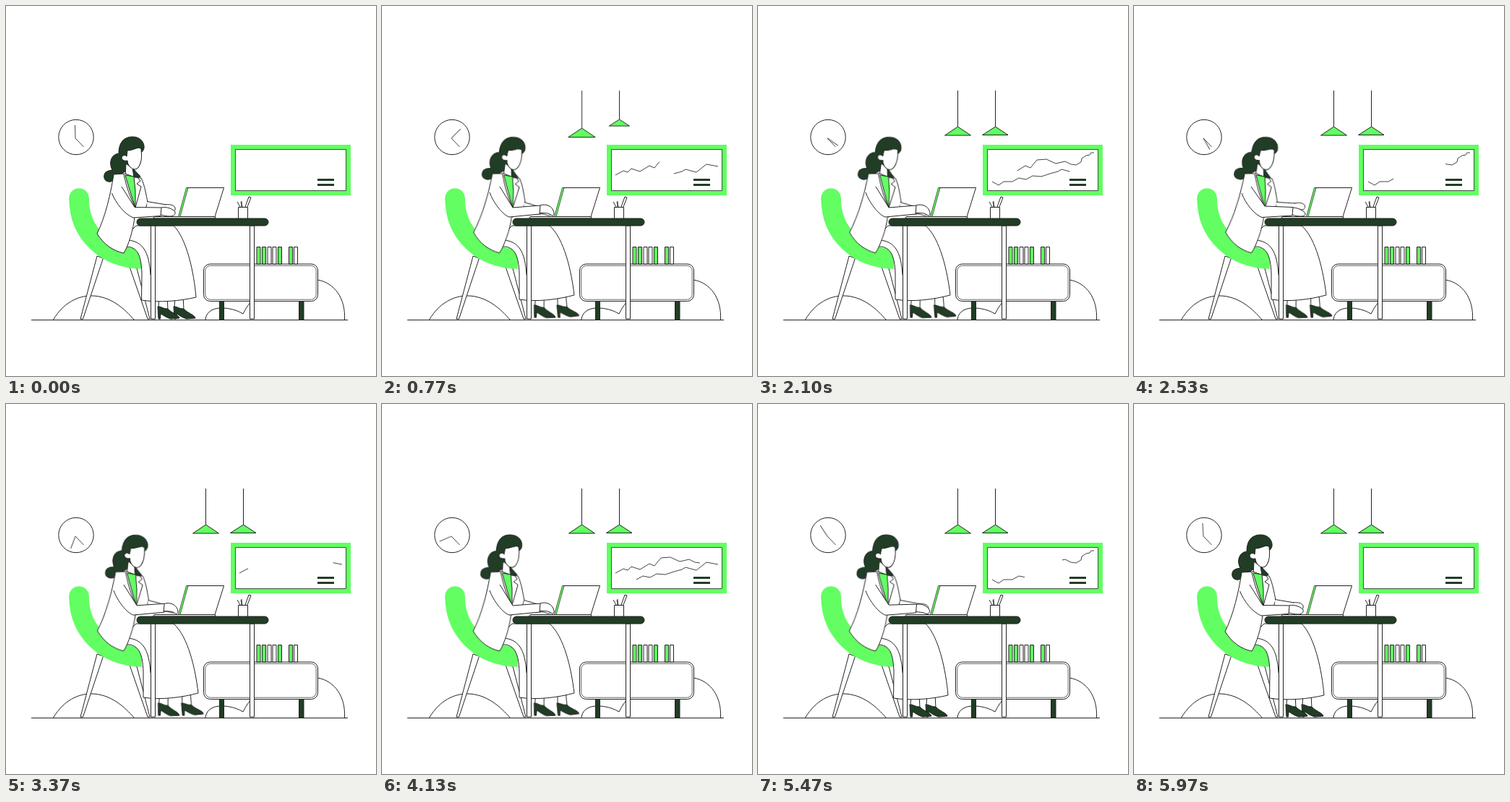
An HTML page without scripts that plays this animation: 512 by 512 pixels, repeating every 6000 ms.

```html
<!DOCTYPE html>
<html lang="en">
<head>
<meta charset="utf-8">
<title>Working at a desk</title>
<style>
  @property --lean { syntax: "<number>"; inherits: true; initial-value: 0; }
  :root { --ink: #222; --green: #62fe62; --dark: #213d25; }
  html, body { margin: 0; width: 100%; height: 100%; overflow: hidden; background: #fff; }
  svg { display: block; width: 100%; height: 100%; fill: #fff; stroke: var(--ink); stroke-width: 1; stroke-linejoin: round; }
  .g { fill: var(--green); }
  .d { fill: var(--dark); }
  .n { fill: none; }
  .soft { stroke: #444; }
  .flat { stroke: none; }

  .minute, .torso, .far, .foot, .lamp, .near, .hand, .skirt { animation: 6s linear infinite; }

  .minute { animation-name: turn; transform-origin: 96px 183px; }
  @keyframes turn { to { transform: rotate(360deg); } }

  .lamp { transform-origin: 276.5px 117px; animation-name: drop; }
  .lamp path { vector-effect: non-scaling-stroke; }
  .late { transform-origin: 328.5px 117px; animation-name: drop-late; }
  @keyframes drop {
    0%, .5% { transform: scale(0); animation-timing-function: ease-out; }
    9% { transform: scale(1.1); animation-timing-function: ease-in-out; }
    16%, 100% { transform: scale(1); }
  }
  @keyframes drop-late {
    0%, 8% { transform: scale(0); animation-timing-function: ease-out; }
    17% { transform: scale(1.1); animation-timing-function: ease-in-out; }
    21.5%, 100% { transform: scale(1); }
  }

  .chart { stroke-dasharray: 1 2; animation: draw 3s infinite; }
  @keyframes draw {
    0%, 2.5% { stroke-dashoffset: 1.01; animation-timing-function: cubic-bezier(.37, 0, .63, 1); }
    52.5%, 55.5% { stroke-dashoffset: 0; animation-timing-function: cubic-bezier(.37, 0, .63, 1); }
    99.5%, 100% { stroke-dashoffset: -1.01; }
  }

  .torso { transform-origin: 172px 330px; transform: rotate(calc(var(--lean) * 2.2deg)); animation-name: lean; animation-timing-function: ease-in-out; }
  .head { transform-origin: 172px 222px; transform: rotate(calc(var(--lean) * 4deg)); }
  @keyframes lean {
    0%, 100% { --lean: 0; }
    12.8% { --lean: 1; }
    27.2% { --lean: .87; }
    42.2% { --lean: 1.1; }
    68.8% { --lean: .36; }
    82.2% { --lean: .9; }
  }

  .near, .hand, .far { animation-timing-function: ease-in-out; }
  .near { animation-name: sleeve; }
  .hand { animation-name: hand; }
  .far { transform-origin: 194px 270px; animation-name: tap; }
  @keyframes sleeve {
    0%, 100% { d: path("M146.500 259C152 273 164 288 176 293L214 290.500L215 279L178 278.500L160 250"); }
    5%, 12.8%, 22%, 34.7%, 47%, 57.5%, 68.8%, 82.2%, 94% { d: path("M149 258C154 272 167 289 176 292L218 288L219 276L181 279L163 250"); }
    9%, 17.5%, 27.2%, 42.2%, 52%, 63%, 75.5%, 88% { d: path("M149 259C154 273 167 289 177 292.500L219 290L220 278.500L181 277L162 250"); }
  }
  @keyframes hand {
    0%, 100% { d: path("M215 279C221 277 232 281 234 285C235 289 231 291 227 291C222 291 218 290 214 289"); }
    5%, 12.8%, 22%, 34.7%, 47%, 57.5%, 68.8%, 82.2%, 94% { d: path("M219 276C226 273 235 277 237 283C239 287 238 291 235 290C230 285 223 287 218 286"); }
    9%, 17.5%, 27.2%, 42.2%, 52%, 63%, 75.5%, 88% { d: path("M220 279C226 279 235 283 237 287C238 290 234 291 230 291C226 291 222 290 219 289"); }
  }
  @keyframes tap {
    0%, 100% { transform: none; }
    5%, 12.8%, 22%, 34.7%, 47%, 57.5%, 68.8%, 82.2%, 94% { transform: translate(2px, 1px) rotate(7deg); }
    9%, 17.5%, 27.2%, 42.2%, 52%, 63%, 75.5%, 88% { transform: translate(1.5px, 1px) rotate(-6deg); }
  }

  .foot, .skirt { animation-timing-function: ease-in-out; }
  .foot { animation-name: rest; transform-origin: 212px 416px; }
  .front { animation-name: step; transform-origin: 234px 418px; }
  .skirt { animation-name: sway; }
  @keyframes rest {
    0%, 82%, 100% { transform: none; }
    12.8%, 69% { transform: translate(.5px, -2px) rotate(2deg); }
  }
  @keyframes step {
    0%, 82%, 100% { transform: none; }
    12.8%, 69% { transform: translate(10px, -2px) rotate(-3deg); }
    27%, 42% { transform: translate(11.5px, -2px) rotate(-2deg); }
  }
  @keyframes sway {
    0%, 82%, 100% { d: path("M164 333C184 332 187 348 188 370L187.500 407C212 411 242 408 263 403C260 368 250 322 232 304L180 304L164 320Z"); }
    12.8%, 69% { d: path("M164 333C184 331 189 346 190 370L190 406C214 410 244 406 266 400C262 366 252 322 232 304L180 304L164 320Z"); }
  }
</style>
</head>
<body>
<svg viewBox="0 0 512 512">
  <defs>
    <g id="shoe">
      <path d="M212 400L211 417L224 421L223 400"/>
      <path class="d" d="M210 416C213 415 217 419 224 419C229 425 239 427 240 432L228 433C221 431 217 427 214 426L213.500 433H211Z"/>
    </g>
    <path id="book" d="M0 333.500h5v23.500h-5z"/>
  </defs>

  <!-- room -->
  <path d="M65.500 434C80 410 100 401 118 401C145 401 165 420 177 434"/>
  <path d="M276 434C277 421 290 417 302 418C315 419 323 423 328 426C332 418 336 412 341 407L431 379C455 383 470 405 468.500 434"/>
  <path class="n" d="M35 434.500H473"/>

  <circle cx="97" cy="181.500" r="24.200"/>
  <path class="n soft" d="M96 183L107.500 195"/>
  <path class="n soft minute" d="M96 183L95.500 165"/>

  <g class="lamp">
    <path d="M276.500 117V167"/>
    <path class="g" d="M258.500 179L276.500 167L294.500 179Z"/>
  </g>
  <g class="lamp late">
    <path d="M328.500 117V167"/>
    <path class="g" d="M310.500 178.500L328.500 167L346 178.500Z"/>
  </g>

  <path class="g flat" d="M311 192H477V262H311Z"/>
  <path d="M317.500 198.500H470.500V255.500H317.500Z" stroke-width=".8"/>
  <path class="d flat" d="M431 239h23v3h-23zM431 246h23v3h-23z"/>
  <path class="n soft chart" pathLength="1" d="M323 234L334 228L340 230L345 225L357 229L370 221L377 224L386 213L399 212L412 218L425 215L433 219L440 220L447 216L448 211L454 207L459 206L461 203H465"/>
  <path class="n soft chart" pathLength="1" d="M465 222L449 219L435 230L420 226L415 229L404 232L392 236L380 235L371 240L361 238L352 243H340L333 248L324 243"/>

  <!-- cabinet -->
  <path class="d" d="M295.500 408h6v26h-6zM405.500 408h6.500v26h-6.500z"/>
  <rect x="273.500" y="357" width="158" height="51.500" rx="9"/>
  <rect x="275.800" y="359.300" width="153.400" height="46.900" rx="7" stroke-width=".7"/>
  <g class="g">
    <use href="#book" x="347"/><use href="#book" x="354.500"/>
    <use href="#book" x="376.500"/><use href="#book" x="391.500"/>
  </g>
  <use href="#book" x="362"/><use href="#book" x="369"/><use href="#book" x="398.500"/>

  <!-- chair -->
  <path d="M126 346L103 433H106.500L134.500 349ZM171 361L196 433H199L181 363Z"/>
  <path class="n" d="M101 266C101 315 138 349 188 350" style="stroke:var(--green);stroke-width:27.500"/>
  <circle class="g flat" cx="101" cy="266" r="13.750"/>

  <!-- legs and skirt -->
  <g class="foot front"><use href="#shoe" x="22"/></g>
  <g class="foot"><use href="#shoe"/></g>
  <path class="skirt" d="M164 333C184 332 187 348 188 370L187.500 407C212 411 242 408 263 403C260 368 250 322 232 304L180 304L164 320Z"/>
  <path class="n" d="M169 324C188 326 198 338 200 372"/>

  <!-- desk -->
  <path d="M200.500 304h6v129h-6zM337.500 304h6v129h-6z"/>
  <path class="n" d="M331 278L336 264L339 265L334 278M324 278L320 271M326 278V270M327 278L325 271"/>
  <path d="M321.500 278.500h13v16h-13z"/>
  <path d="M204 294L205 291.500H289.500V294Z"/>
  <path d="M251.500 251.500H301.500L289 291.500H239Z"/>
  <path class="g" d="M249.500 251.500H252L241 291.500H238.500Z" stroke-width=".7"/>

  <!-- woman -->
  <g class="torso">
    <g class="head">
      <path class="d" d="M156 204C156 188 164 181 175 181C186 181 192 189 191 197C190 201 187 203 184 204L176 224C179 230 183 232 186 236C180 238 174 236 171 230L164 229C160 234 155 233 152 234C152 242 145 245 139 242C134 239 135 231 140 229C143 227 145 228 147 227C142 217 145 206 156 204Z"/>
      <path d="M166 218L165 237H177L175 224Z"/>
      <path d="M168 200C173 200 177 198 180 197C183 196 186 196 187 198C188 206 188 216 184 222C181 227 176 227 172 223C169 220 168 217 168 214C163 215 160 213 160 210C160 207 164 205 167 208Z"/>
    </g>
    <path d="M149 233L165 232L178 237L187 238C192 248 194 262 196 271L192 284L178 292C176 310 170 330 163 342C149 339 136 331 126 315C137 293 145 260 149 233Z"/>
    <path class="g" d="M165 234L177 236L179 256L179 279C174 264 169 248 165 234Z"/>
    <path class="n" d="M163 233C167 251 172 266 179 279L187 250L181 246L186 242L182 237"/>
  </g>

  <g class="far">
    <path d="M195 270.500L222 275L220 284L196 284"/>
    <path d="M220 275C226 274 232 275 234 279C235 284 231 286 227 284L219 283"/>
  </g>
  <path class="d" d="M186 294H358A5 5 0 0 1 358 304H186A5 5 0 0 1 186 294Z"/>
  <path class="hand" d="M215 279C221 277 232 281 234 285C235 289 231 291 227 291C222 291 218 290 214 289"/>
  <path class="near" d="M146.500 259C152 273 164 288 176 293L214 290.500L215 279L178 278.500L160 250"/>
</svg>
</body>
</html>
```
